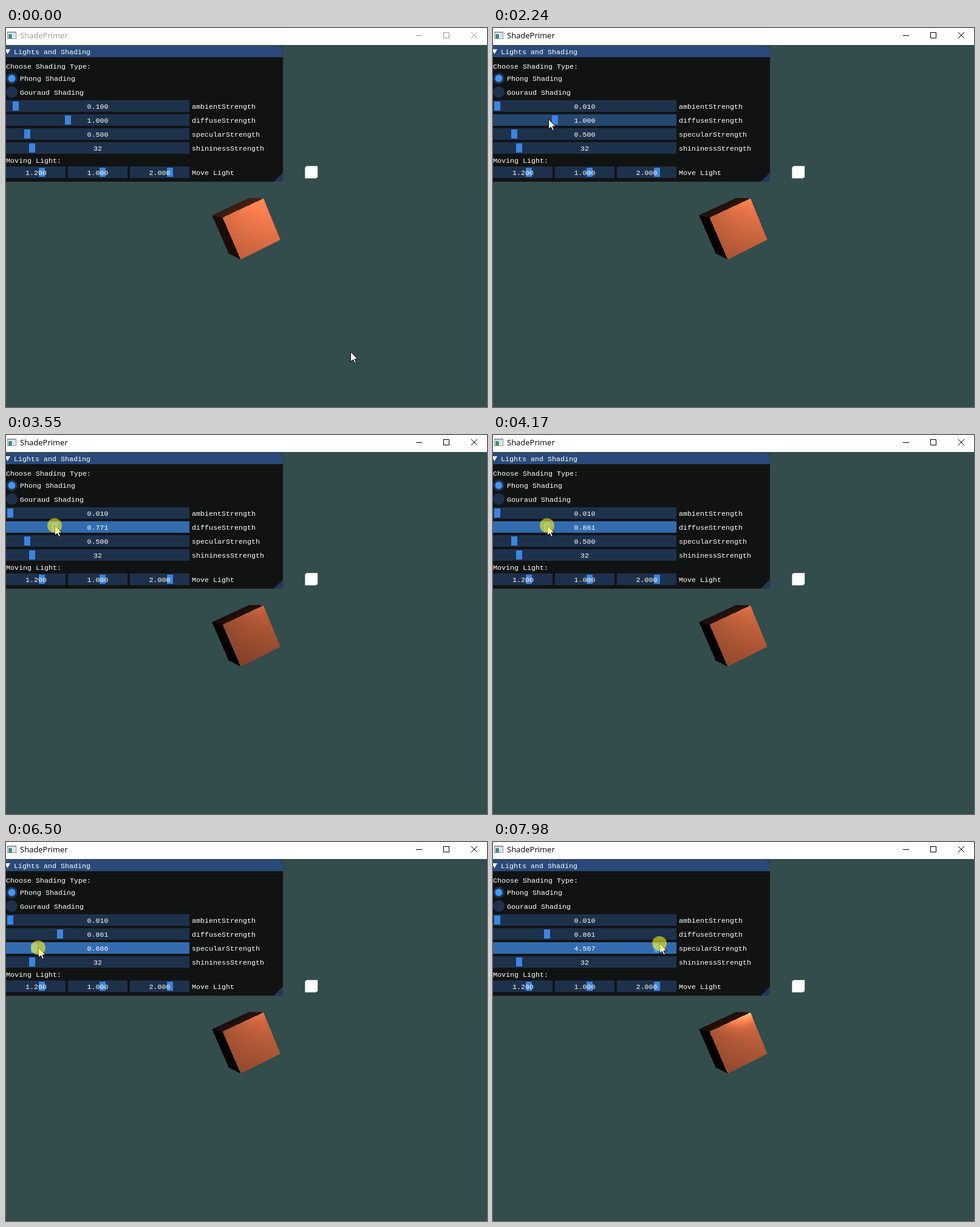
An HTML page with a canvas for the animation above (8 s loop, 792x624 px).

```html
<!DOCTYPE html>
<html lang="en">
<head>
<meta charset="utf-8">
<title>Lights and Shading</title>
<style>
  html, body { margin: 0; width: 100%; height: 100%; overflow: hidden; background: #334c4c; }
  canvas, svg { position: absolute; left: 0; top: 0; width: 792px; height: 624px; }
  .ui text { font: 11.667px "Liberation Mono", monospace; fill: #fff; white-space: pre; }
  .mid { text-anchor: middle; }
  .frame { fill: #1e314b; }
  .frame.hover { fill: #254770; }
  .frame.active { fill: #326bae; }
  .grab { fill: #3d85e0; }
  .active + .grab { fill: #4296fa; }
  #bar { color: #999; }
  #bar.focus { color: #000; }
  #bar text { font: 13px "Open Sans", sans-serif; fill: currentColor; }
  #bar path { stroke: currentColor; fill: none; }
</style>
</head>
<body>
<canvas id="scene" width="792" height="624"></canvas>
<svg viewBox="0 0 792 624">
  <rect width="792" height="28" fill="#fff"/>
  <g id="icon">
    <rect x="2.5" y="6.5" width="14" height="11" fill="#fff" stroke="#7d868c"/>
    <rect x="3" y="7" width="13" height="2" fill="#b4c3cf"/>
    <rect x="4" y="10" width="6" height="7" fill="#3f8f86"/>
    <rect x="11" y="10" width="4" height="6" fill="#d9dfe3"/>
  </g>
  <g id="bar">
    <text x="23" y="17">ShadePrimer</text>
    <path d="M675 12.5h10M720.5 7.5h9v9h-9z" shape-rendering="crispEdges"/>
    <path d="M766 7l10 10M776 7l-10 10"/>
  </g>
  <g class="ui" id="panel">
    <rect x="-10" y="29.5" width="466.5" height="224" rx="7" fill="#111313" stroke="#40414a"/>
    <path d="M0 30H449a7 7 0 0 1 7 7V48H0z" fill="#294a7a"/>
    <path d="M-2 35H7L2.5 43z" fill="#fff"/>
    <path d="M456 238V247a6 6 0 0 1-6 6H441z" fill="#22395a"/>
    <text x="13" y="43">Lights and Shading</text>
    <text x="0" y="67">Choose Shading Type:</text>
    <circle cx="9.5" cy="83" r="9.5" fill="#1e314b"/>
    <circle cx="9.5" cy="83" r="6" fill="#4296fa"/>
    <text x="23" y="87">Phong Shading</text>
    <circle cx="9.5" cy="105.5" r="9.5" fill="#1e314b"/>
    <text x="23" y="110">Gouraud Shading</text>
    <text x="0" y="222">Moving Light:</text>
  </g>
  <path id="cursor" d="M0 0V16.5L4 13L6.6 18.8L9 17.7L6.5 12H11.7z" fill="#fff" stroke="#000"/>
  <circle id="press" r="12" fill="#fff51e" fill-opacity=".58"/>
</svg>
<script>
const $ = id => document.getElementById(id);
const LOOP = 8000;

// ---- panel ----
function add(tag, attrs, text = '') {
  const el = document.createElementNS('http://www.w3.org/2000/svg', tag);
  for (const k in attrs) el.setAttribute(k, attrs[k]);
  el.textContent = text;
  return $('panel').appendChild(el);
}

function slider(x, y, w, grabX, value, label) {
  const frame = add('rect', { class: 'frame', x, y, width: w, height: 19 });
  const grab = add('rect', { class: 'grab', x: grabX - 5, y: y + 2, width: 10, height: 15 });
  const text = add('text', { class: 'mid', x: Math.max(x, 0) + w / 2, y: y + 14 }, value);
  if (label) add('text', { x: 306, y: y + 14 }, label);
  return { y, frame, grab, text };
}

const sliders = [
  { ...slider(0, 119, 302, 16, '0.100', 'ambientStrength'), scale: 95.5 },
  { ...slider(0, 142, 302, 102, '1.000', 'diffuseStrength'), scale: 95.5 },
  { ...slider(0, 165, 302, 35, '0.500', 'specularStrength'), scale: 57.8 }
];
slider(0, 188, 302, 43, '32', 'shininessStrength');
slider(-1, 228, 99, 59, '1.200');
slider(102, 228, 98, 159, '1.000');
slider(204, 228, 98, 270, '2.000', 'Move Light');

// ---- lit cube ----
const FOCAL = 300 / Math.tan(Math.PI / 8), CX = 394, CY = 328;
const EYE = [0, 0, 10], LAMP = [1.2, 1, 2];
const dot = (a, b) => a[0] * b[0] + a[1] * b[1] + a[2] * b[2];
const sub = (a, b) => a.map((v, i) => v - b[i]);
const unit = a => a.map(v => v / Math.hypot(...a));
const cross = (a, b) => [a[1] * b[2] - a[2] * b[1], a[2] * b[0] - a[0] * b[2], a[0] * b[1] - a[1] * b[0]];

// Cube axes: 30 degrees around (1, 2, 3)
const AXIS = unit([1, 2, 3]), COS = Math.cos(Math.PI / 6), SIN = .5;
const axes = [[1, 0, 0], [0, 1, 0], [0, 0, 1]].map(e => {
  const c = cross(AXIS, e), d = dot(AXIS, e) * (1 - COS);
  return e.map((v, i) => v * COS + c[i] * SIN + AXIS[i] * d);
});
const SIDES = [-1, 1, 1];   // left, top and front face the eye

const ctx = $('scene').getContext('2d');
const BOX = { x: 336, y: 276, w: 120, h: 110 };
const image = ctx.createImageData(BOX.w, BOX.h);
const lit = [];

function trace(px, py) {
  const ray = [px + .5 - CX, CY - py - .5, -FOCAL];
  const o = axes.map(a => dot(a, EYE)), d = axes.map(a => dot(a, ray));
  for (let i = 0; i < 3; i++) {
    const s = (SIDES[i] / 2 - o[i]) / d[i];
    if (!axes.every((_, j) => j === i || Math.abs(o[j] + s * d[j]) <= .5)) continue;
    const p = EYE.map((v, j) => v + s * ray[j]);
    const n = axes[i].map(v => v * SIDES[i]);
    const l = unit(sub(LAMP, p)), v = unit(sub(EYE, p)), nl = dot(n, l);
    const r = n.map((c, j) => 2 * nl * c - l[j]);
    return { diffuse: Math.max(nl, 0), specular: Math.max(dot(v, r), 0) ** 32 };
  }
}

for (let i = 0; i < BOX.w * BOX.h; i++) {
  const hit = trace(BOX.x + i % BOX.w, BOX.y + Math.floor(i / BOX.w));
  if (hit) lit.push({ at: i * 4, ...hit });
}

function shade([ambient, diffuse, specular]) {
  for (const p of lit) {
    const k = 255 * (ambient + diffuse * p.diffuse + specular * p.specular);
    image.data.set([k, k * .5, k * .31, 255], p.at);
  }
  ctx.putImageData(image, BOX.x, BOX.y);
}

// Lamp: silhouette of a small upright cube
const corner = (sx, sy, sz) => {
  const k = FOCAL / (EYE[2] - LAMP[2] - sz * .1);
  return [CX + k * (LAMP[0] + sx * .1), CY - k * (LAMP[1] + sy * .1)];
};
ctx.fillStyle = '#fff';
ctx.beginPath();
for (const c of [[-1, 1, 1], [-1, 1, -1], [-1, -1, -1], [1, -1, -1], [1, -1, 1], [1, 1, 1]]) ctx.lineTo(...corner(...c));
ctx.fill();

// ---- timeline ----
// start, end, steps, cursor x, y, dragged slider, its value
const moves = [
  [70, 680, 9, 20, 131],
  [850, 1380, 8, 52, 130, 0, .477],
  [1610, 1920, 5, 5, 126, 0, .01],
  [2090, 2240, 3, 91, 150],
  [2317, 2860, 8, 100, 149, 1, .98],
  [2930, 3090, 3, 65, 149, 1, .664],
  [3160, 3160, 1, 60, 149, 1, .565],
  [3320, 3850, 8, 100, 149, 1, .978],
  [4020, 4170, 3, 89, 149, 1, .861],
  [4330, 4960, 9, 36, 176],
  [5180, 5180, 1, 36, 176, 2, .519],
  [5810, 6110, 5, 17, 173, 2, .19],
  [6420, 6500, 2, 53, 174, 2, .686],
  [6577, 7120, 8, 152, 173, 2, 2.526],
  [7440, 7980, 8, 274, 167, 2, 4.567]
];
const presses = [[850, 2090], [2620, 4330], [5180, LOOP]];
const mix = (a, b, p) => a + (b - a) * p;

function stateAt(t) {
  const s = { x: 567, y: 533, values: [.1, 1, .5] };
  moves.forEach(([from, to, n, x, y, id, value], i) => {
    if (t < from) return;
    const step = Math.floor((t - from) / (to - from || 1) * (n - 1) + .05) + 1;
    let p = Math.min(step, n) / n;
    if (i === 0) p = p * p * (3 - 2 * p);
    s.x = mix(s.x, x, p);
    s.y = mix(s.y, y, p);
    // A slider only follows while the button is down
    if (id !== undefined && t >= presses[id][0]) s.values[id] = mix(s.values[id], value, p);
  });
  s.active = presses.findIndex(([a, b]) => t >= a && t < b);
  s.focus = t >= presses[0][0];
  return s;
}

let shown = '';
function draw(t) {
  const s = stateAt(t), x = Math.round(s.x), y = Math.round(s.y);
  $('bar').classList.toggle('focus', s.focus);
  sliders.forEach((sl, i) => {
    const over = s.focus && s.active < 0 && x <= 302 && y >= sl.y && y < sl.y + 19;
    sl.frame.classList.toggle('active', s.active === i);
    sl.frame.classList.toggle('hover', over);
    sl.grab.setAttribute('x', Math.round(6.3 + s.values[i] * sl.scale) - 5);
    sl.text.textContent = s.values[i].toFixed(3);
  });
  $('cursor').setAttribute('transform', `translate(${x + .5} ${y})`);
  $('press').setAttribute('transform', `translate(${x} ${y})`);
  $('press').style.display = s.active < 0 ? 'none' : '';
  const key = s.values.join();
  if (key !== shown) shade(s.values);
  shown = key;
}

const began = performance.now();
function tick() {
  draw((performance.now() - began) % LOOP);
  requestAnimationFrame(tick);
}
tick();
</script>
</body>
</html>
```
